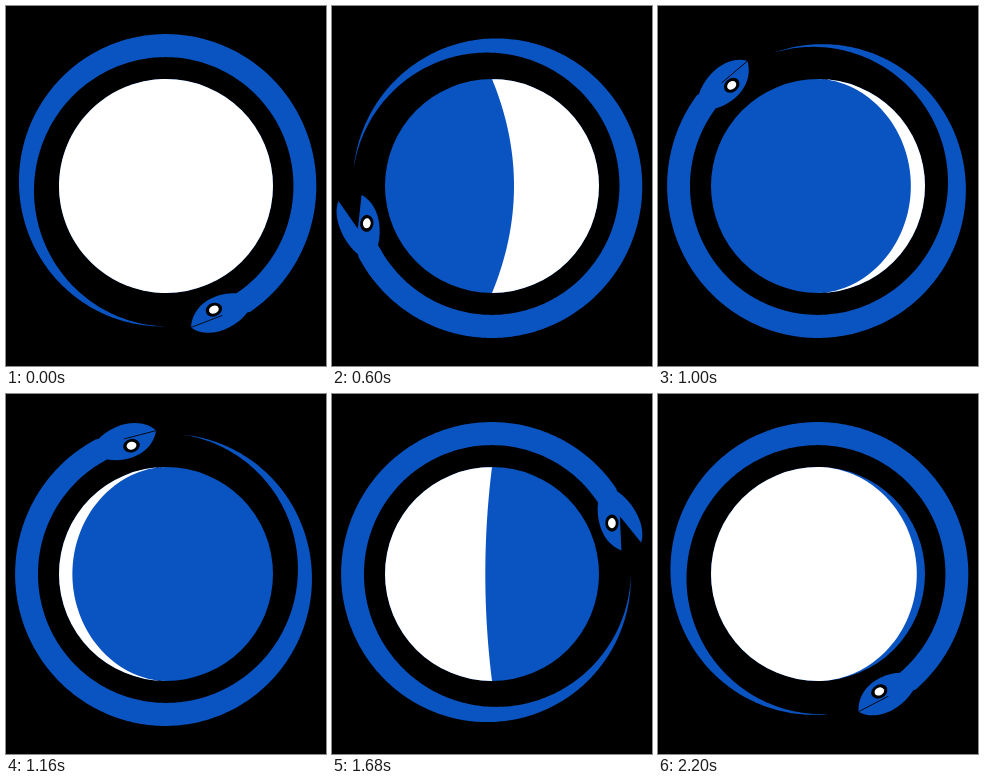
Write an HTML page with a canvas that moves like this. It is 320 px wide and 360 px high and loops after 2.24 s.

```html
<!DOCTYPE html>
<html lang="en">
<head>
<meta charset="utf-8">
<title>Snake and moon</title>
<style>
html, body { margin: 0; width: 100%; height: 100%; overflow: hidden; background: #000; }
canvas { display: block; }
</style>
</head>
<body>
<canvas id="stage" width="320" height="360"></canvas>
<script>
const ctx = document.getElementById('stage').getContext('2d');
const LOOP = 2240, STEP = 40, TAU = Math.PI * 2, RAD = Math.PI / 180;
const BLUE = '#0a54c2', MOON = 107, NEW_MOON = 1080;

// Head points, relative to the centre of the ring
const HINGE = [57, 129], TIP = [25.5, 141], EYE = [48.5, 123.3];
const NECK_IN = [71, 107], NECK_OUT = [84, 124];

// Terminator offset at each time
const PHASES = [
  [0, -107], [280, -41], [600, 22], [NEW_MOON, 107],
  [NEW_MOON, -107], [1720, 0], [LOOP, 107]
];

const clamp = v => Math.min(1, Math.max(0, v));
const body = makeBody();

function makeBody() {
  const path = new Path2D(), from = 90, to = 416;
  const add = (deg, side) => {
    const grow = Math.min(deg - from, 180) / 2 * RAD;
    const r = 140 + side * 11.5 * Math.sin(grow) ** 1.2;
    path.lineTo(r * Math.cos(deg * RAD), r * Math.sin(deg * RAD));
  };
  for (let d = from; d <= to; d++) add(d, 1);
  path.lineTo(...HINGE);
  for (let d = to; d >= from; d--) add(d, -1);
  return path;
}

function ellipse([x, y], rx, ry, tilt, color) {
  ctx.fillStyle = color;
  ctx.beginPath();
  ctx.ellipse(x, y, rx, ry, tilt, 0, TAU);
  ctx.fill();
}

function terminator(t) {
  const i = PHASES.findIndex(([time]) => time > t);
  const [t0, x0] = PHASES[i - 1], [t1, x1] = PHASES[i];
  return x0 + (x1 - x0) * (t - t0) / (t1 - t0);
}

function drawMoon(t) {
  const side = t < NEW_MOON ? 1 : -1;
  const x = terminator(t), k = Math.abs(x) / MOON;
  // Power 1 bends the edge as an ellipse, 2 as a pointed arc
  const power = 1 + (x * side < 0 ? 0.3 * (1 - k) : clamp(1.8 * (0.9 - k)));
  ellipse([0, 0], MOON, MOON, 0, BLUE);
  ctx.fillStyle = '#fff';
  ctx.beginPath();
  ctx.arc(0, 0, MOON, -Math.PI / 2, Math.PI / 2, side < 0);
  for (let i = 0; i <= 90; i++) {
    const a = i * 2 * RAD;
    ctx.lineTo(x * Math.abs(Math.sin(a)) ** power, MOON * Math.cos(a));
  }
  ctx.fill();
}

function turn([x, y], angle) {
  const [hx, hy] = HINGE, c = Math.cos(angle), s = Math.sin(angle);
  return [hx + (x - hx) * c - (y - hy) * s, hy + (x - hx) * s + (y - hy) * c];
}

// The front of the jaw swings on the hinge, the neck stays
function drawJaw(angle, front, back, neck, otherNeck) {
  ctx.fillStyle = BLUE;
  ctx.beginPath();
  ctx.moveTo(...turn(TIP, angle));
  ctx.bezierCurveTo(...turn(front, angle), ...turn(back, angle), ...neck);
  ctx.lineTo(...otherNeck);
  ctx.lineTo(...HINGE);
  ctx.fill();
}

function drawSeam(angle) {
  ctx.lineWidth = 0.8;
  ctx.strokeStyle = '#000';
  ctx.beginPath();
  ctx.moveTo(...turn(TIP, angle));
  ctx.lineTo(...HINGE);
  ctx.stroke();
}

function gape(t) {
  const d = Math.abs(t % 1120 - 640);
  return d < 320 ? 21.5 * RAD * Math.cos(d / 640 * Math.PI) ** 2 : 0;
}

function drawSnake(t) {
  const open = gape(t), eye = turn(EYE, open), tilt = open - 20 * RAD;
  // The ring is slightly taller than wide
  ctx.translate(-0.3, 0);
  ctx.scale(0.994, 1.003);
  ctx.rotate(t / LOOP * TAU);
  ctx.fillStyle = BLUE;
  ctx.fill(body);
  drawJaw(-open, [38, 151], [66, 148], NECK_OUT, NECK_IN);
  drawJaw(open, [27, 116], [53, 105.5], NECK_IN, NECK_OUT);
  drawSeam(-open);
  ellipse(eye, 8.5, 6.7, tilt, '#000');
  ellipse(eye, 5, 3.9, tilt, '#fff');
}

function frame() {
  const t = Math.floor(performance.now() / STEP) * STEP % LOOP;
  ctx.setTransform(1, 0, 0, 1, 0, 0);
  ctx.fillStyle = '#000';
  ctx.fillRect(0, 0, 320, 360);
  ctx.translate(160, 180);
  drawMoon(t);
  drawSnake(t);
  requestAnimationFrame(frame);
}
frame();
</script>
</body>
</html>
```
